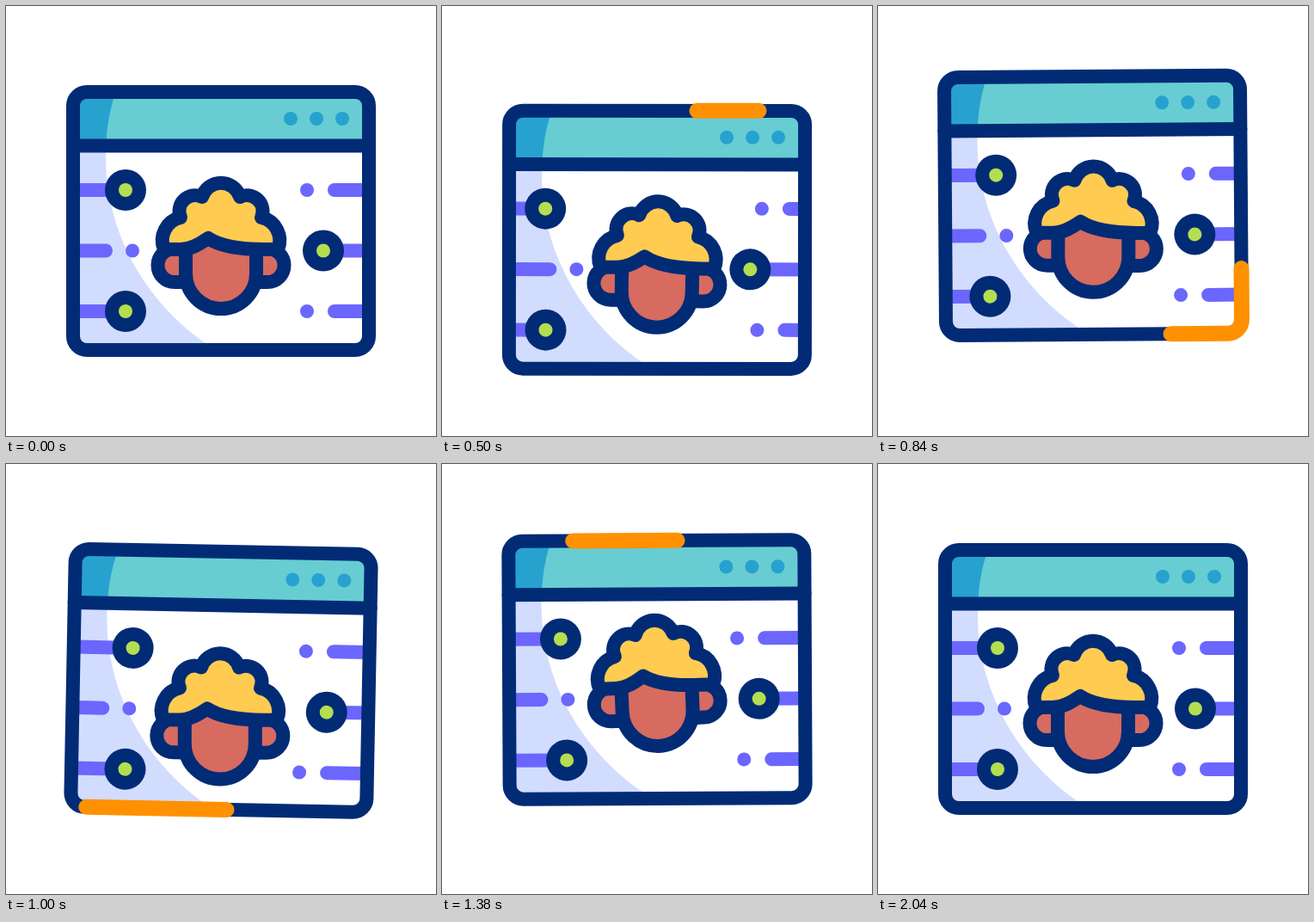
An HTML page that plays this animation: 500 px wide and 500 px high, repeating every 2.26 s.

```html
<!DOCTYPE html>
<html lang="en">
<head>
<meta charset="utf-8">
<title>Profile window</title>
<style>
  html, body { margin: 0; width: 100%; height: 100%; overflow: hidden; background: #fff; }
  svg { display: block; width: 100%; height: 100%; }
  .ink { stroke: #022b76; stroke-width: 16; stroke-linejoin: round; stroke-linecap: round; }
  .bar { stroke: #6b66fe; stroke-width: 16; stroke-linecap: round; }
  .dot { fill: #6b66fe; }
  .skin { fill: #d76b5f; }
</style>
</head>
<body>
<svg viewBox="0 0 500 500">
  <defs>
    <clipPath id="inside"><rect x="80" y="102" width="340" height="296"/></clipPath>
    <clipPath id="head"><rect x="80" y="102" width="340" height="60"/></clipPath>
    <path id="shade" d="M125 108C119 128 116 150 116 176C116 262 161 343 232 392L240 400H70V100H127Z"/>
    <g id="node"><circle r="24" fill="#022b76"/><circle r="8" fill="#b4de50"/></g>
  </defs>
  <g id="win">
    <rect x="78" y="100" width="344" height="300" rx="16" fill="#fff"/>
    <use href="#shade" fill="#d2dcfe" clip-path="url(#inside)"/>
    <rect x="80" y="102" width="340" height="60" fill="#67cdd2"/>
    <use href="#shade" fill="#27a2cf" clip-path="url(#head)"/>
    <g fill="#27a2cf">
      <circle cx="331" cy="131" r="8"/><circle cx="361" cy="131" r="8"/><circle cx="391" cy="131" r="8"/>
    </g>
    <g id="rows"></g>
    <g class="ink" fill="none">
      <path d="M78 162.5H422"/>
      <rect x="78" y="100" width="344" height="300" rx="16"/>
    </g>
    <path id="runner" fill="none" stroke="#ff9100" stroke-width="18" stroke-linecap="round"
      d="M261 100H406a16 16 0 0 1 16 16V384a16 16 0 0 1-16 16H94a16 16 0 0 1-16-16V116a16 16 0 0 1 16-16H410"/>
    <g id="face" class="ink">
      <path class="skin" d="M209 282H196a19.5 19.5 0 0 0 0 39H209M291 282H304a19.5 19.5 0 0 1 0 39H291"/>
      <path class="skin" d="M209 276V311a41 41 0 0 0 82 0V276"/>
      <path fill="#ffcb50" d="M184 283A27 27 0 0 1 203 246A18.5 18.5 0 0 1 228 222A23 23 0 0 1 272 222A18.5 18.5 0 0 1 297 246A27 27 0 0 1 316 283H300C275 283 250 280 235 270C225 277 215 283 203 283Z"/>
    </g>
  </g>
</svg>
<script>
const LOOP = 2260, STEP = 20;
const START = 120, END = 2040;     // face and rows
const SHAKE = 149, BEAT = 175;     // window: one swing from side to side per beat
const HOPS = [0, 7, 22, -21, -18, 5, 14, -12, 15, 0];
const TRACK = 1408;                // length of the runner's way

const { sin, cos, PI, min, max, floor } = Math;
const $ = id => document.getElementById(id);
const clamp = x => min(1, max(0, x));
const smooth = x => x * x * (3 - 2 * x);
const progress = (t, from, span) => clamp((t - from) / span);

function windowPose(t) {
  const beat = min(max((t - SHAKE) / BEAT, 0), HOPS.length - 1);
  const i = min(floor(beat), HOPS.length - 2);
  const y = HOPS[i] + (HOPS[i + 1] - HOPS[i]) * (beat - i);
  const turn = 8 / PI * Math.asin(sin(PI * beat));
  return `translate(0 ${y}) rotate(${turn} 250 250)`;
}

// Out, back and out again; a lag bends the timing but keeps both ends at rest
function drift(t, lag, bias = .35) {
  const v = progress(t, START, END - START);
  const u = v - lag * sin(PI * v);
  return sin(3 * PI * u) + bias * sin(PI * u);
}

function facePose(t) {
  const v = progress(t, START, END - START);
  const fade = smooth(progress(t, START, 200)) * smooth(progress(-t, -END, 320));
  const y = 13 * fade * cos(PI * (t - SHAKE - BEAT) / (2 * BEAT));
  const turn = 4.8 * v * drift(t, .08, 0);
  return `translate(0 ${y}) rotate(${turn} 250 300)`;
}

const L = 80, R = 420;
const bar = (x, y, edge) => `<path class="bar" d="M${edge} ${y}H${x}"/>`;
const node = (x, y, edge) => bar(x, y, edge) + `<use href="#node" x="${x}" y="${y}"/>`;
const dash = (x, y, edge) =>
  bar(x, y, edge) + `<circle class="dot" cx="${x + (edge === L ? 31 : -32)}" cy="${y}" r="8"/>`;

const rows = [
  { part: node, x: 139, y: 214, edge: L, reach: -16, lag: .02 },
  { part: dash, x: 382, y: 214, edge: R, reach: 19, lag: .08 },
  { part: dash, x: 116, y: 284.5, edge: L, reach: 8, lag: .04 },
  { part: node, x: 369, y: 284.5, edge: R, reach: -9, lag: .02 },
  { part: node, x: 139, y: 355, edge: L, reach: -16, lag: .08 },
  { part: dash, x: 382, y: 355, edge: R, reach: 14, lag: .02 }
];

function drawRunner(t) {
  const along = (from, span) => {
    const u = progress(t, from, span);
    return TRACK * (.85 * smooth(u) + .15 * u);
  };
  const tail = along(400, 1325), length = along(300, 1310) - tail;
  const runner = $('runner');
  runner.style.display = length > 0 ? '' : 'none';
  runner.setAttribute('stroke-dasharray', `${max(length, .01)} 3000`);
  runner.setAttribute('stroke-dashoffset', -tail);
}

function draw(now) {
  const t = floor(now % LOOP / STEP) * STEP;
  $('win').setAttribute('transform', windowPose(t));
  $('face').setAttribute('transform', facePose(t));
  $('rows').innerHTML = rows.map(({ part, x, y, edge, reach, lag }) =>
    part(x + reach * drift(t, lag), y, edge)).join('');
  drawRunner(t);
}

const start = performance.now();
function tick() {
  draw(performance.now() - start);
  requestAnimationFrame(tick);
}
tick();
</script>
</body>
</html>
```
